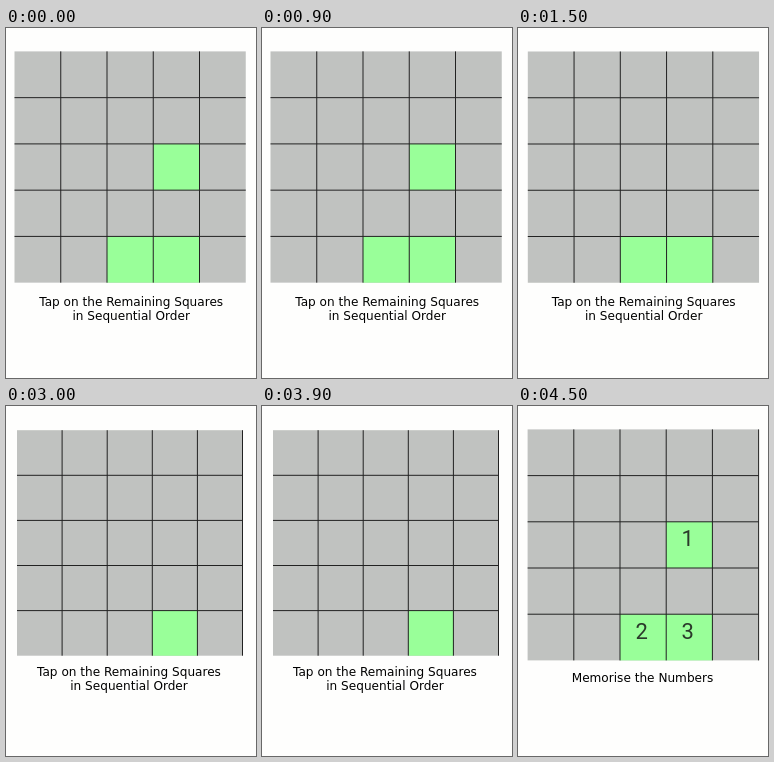
Animation, 250 px wide and 350 px high, one loop 6 s. Source, as an HTML page:

```html
<!DOCTYPE html>
<html lang="en">
<head>
<meta charset="utf-8">
<title>Memory squares</title>
<style>
  html, body { margin: 0; width: 100%; height: 100%; overflow: hidden; background: #fefefd; }
  svg { display: block; width: 250px; height: 350px; }
  text { text-anchor: middle; font-kerning: none; }
  .label { font: 12.1px "DejaVu Sans", Verdana, sans-serif; fill: #000; }
  .digit { font: 22px Roboto, sans-serif; fill: #2b3a2b; }
</style>
</head>
<body>
<svg id="stage" viewBox="0 0 250 350"></svg>
<script>
const STEP = 1500;
const stage = document.getElementById('stage');
const prompt = ['Tap on the Remaining Squares', 'in Sequential Order'];

// x, y, cell: grid origin and square size; lit: [column, row, digit]
const scenes = [
  { x: 8.5, y: 23.4, cell: 46.25, lit: [[3, 2], [2, 4], [3, 4]],
    lines: prompt, cx: 125.2, base: 278 },
  { x: 9.8, y: 23.5, cell: 46.25, lit: [[2, 4], [3, 4]],
    lines: prompt, cx: 125.7, base: 278 },
  { x: 11, y: 24.2, cell: 45.1, lit: [[3, 4]],
    lines: prompt, cx: 123, base: 270, edge: true },
  { x: 9.6, y: 23.4, cell: 46.2, lit: [[3, 2, 1], [2, 4, 2], [3, 4, 3]],
    lines: ['Memorise the Numbers'], cx: 124.5, base: 276, edge: true }
];

const rect = (x, y, w, h, fill) =>
  `<rect x="${x}" y="${y}" width="${w}" height="${h}" fill="${fill}"/>`;
const text = (x, y, cls, s) => `<text x="${x}" y="${y}" class="${cls}">${s}</text>`;

function draw({ x, y, cell, lit, lines, cx, base, edge }) {
  const size = cell * 5;
  const column = i => rect(x + i * cell - 0.5, y, 1, size, '#222');
  const row = i => rect(x, y + i * cell - 0.5, size, 1, '#222');
  let out = rect(x, y, size, size, '#c0c2c0');
  for (const [c, r] of lit)
    out += rect(x + c * cell, y + r * cell, cell, cell, '#99ff99');
  for (let i = 1; i < 5; i++) out += column(i) + row(i);
  if (edge) out += column(5);
  for (const [c, r, n] of lit)
    if (n) out += text(x + (c + 0.5) * cell - 1.5, y + r * cell + 24.5, 'digit', n);
  lines.forEach((s, i) => out += text(cx, base + 14 * i, 'label', s));
  return out;
}

let shown = -1;
function tick(now) {
  const i = Math.floor(now / STEP) % scenes.length;
  if (i !== shown) stage.innerHTML = draw(scenes[shown = i]);
  requestAnimationFrame(tick);
}
tick(0);
</script>
</body>
</html>
```
